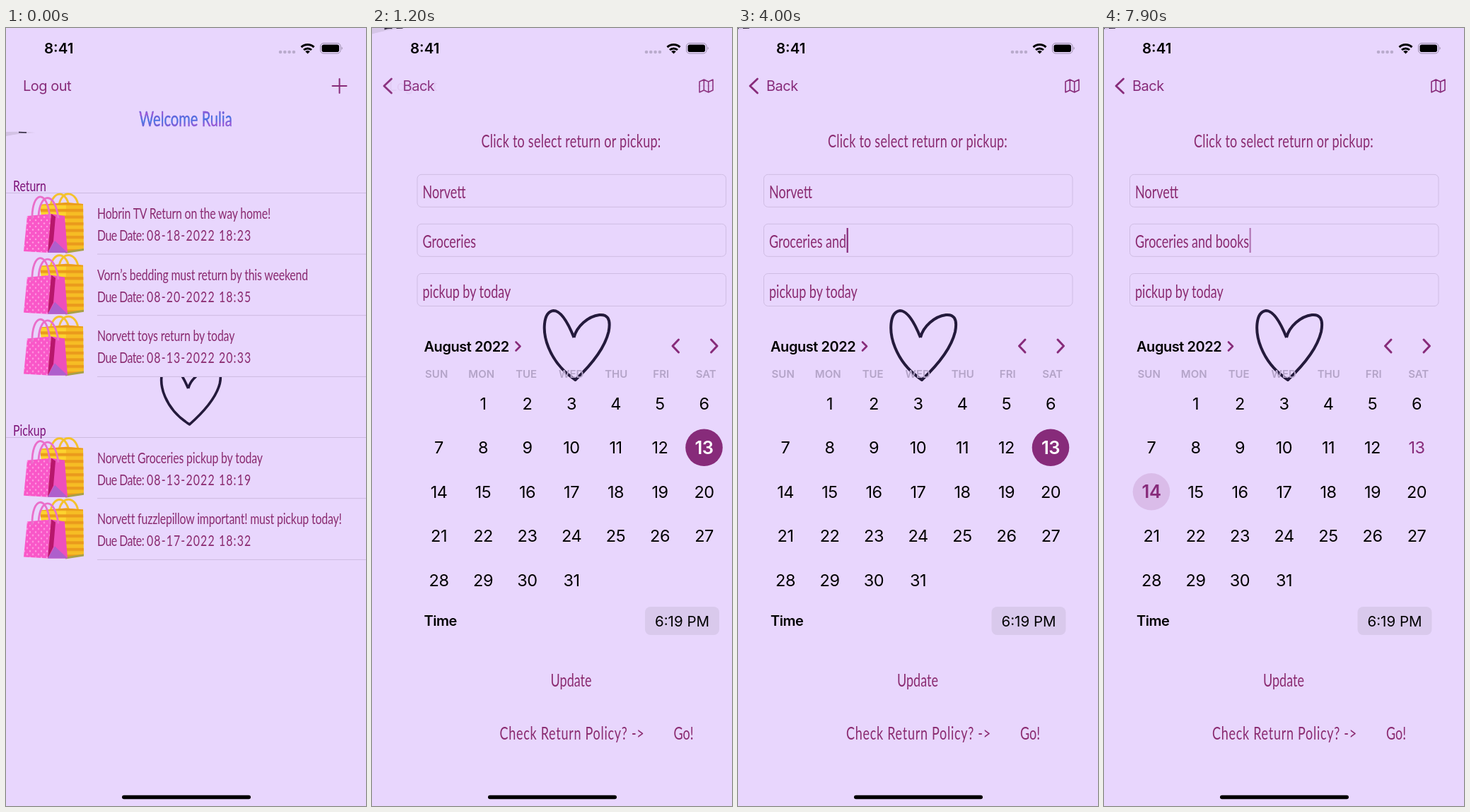
An HTML page that plays this animation: 509 px wide and 1101 px high, repeating every 8000 ms.

```html
<!DOCTYPE html>
<html lang="en">
<head>
<meta charset="utf-8">
<title>Errands</title>
<style>
html, body { margin: 0; width: 100%; height: 100%; overflow: hidden; background: #e8d6fd; }
svg { display: block; width: 100%; height: 100%; }
text { white-space: pre; }
.hand { font-family: Lato, sans-serif; fill: #8a2a70; }
.ui { font-family: Inter, sans-serif; }
.line { fill: none; stroke: #872b7a; stroke-linecap: round; stroke-linejoin: round; }
.rule { stroke: #cdbbe0; stroke-width: 1; }
</style>
</head>
<body>
<svg id="stage" viewBox="0 0 509 1101"></svg>
<script>
const LOOP = 8000, W = 509;
const BG = '#e8d6fd', ACCENT = '#872b7a';
const NARROW = 0.72; // one condensed cut for all handwriting

const hand = (x, y, str, size, opt = '') =>
  `<text class="hand" transform="translate(${x} ${y}) scale(${NARROW} 1)" font-size="${size}" ${opt}>${str}</text>`;
const ui = (x, y, str, size, opt = '') =>
  `<text class="ui" x="${x}" y="${y}" font-size="${size}" ${opt}>${str}</text>`;
const line = (d, width, opt = '') => `<path class="line" d="${d}" stroke-width="${width}" ${opt}/>`;
const rule = (x, y) => `<path class="rule" d="M${x} ${y}H${W}"/>`;
const MID = 'text-anchor="middle"';

const defs = `<defs>
  <linearGradient id="shine" x1="0" y1="0" x2=".06" y2=".3" spreadMethod="reflect">
    <stop offset="0" stop-color="#3f78e4"/><stop offset=".55" stop-color="#6a5fdc"/><stop offset="1" stop-color="#b24fd2"/>
  </linearGradient>
  <pattern id="dots" width="8" height="9" patternUnits="userSpaceOnUse">
    <circle cx="2" cy="2" r="1.2" fill="#ff9ce2"/><circle cx="6" cy="6.5" r="1.2" fill="#ff9ce2"/>
  </pattern>
  <pattern id="bands" width="10" height="9.5" patternUnits="userSpaceOnUse">
    <rect width="10" height="4.2" y="3" fill="#ea9a1c"/>
  </pattern>
  <clipPath id="below"><rect y="494" width="${W}" height="80"/></clipPath>
  <path id="heart" d="M258 438C250 418 240 400 229 400C214 402 213 430 222 452C230 472 245 488 260 498C278 481 301 455 307 430C311 410 304 405 294 406C278 408 262 422 258 438"
    fill="none" stroke="#241a3c" stroke-width="4" stroke-linejoin="round"/>
  <g id="bags">
    <g fill="none" stroke="#f4c22c" stroke-width="3">
      <path d="M39 18C42-4 61-5 65 18"/><path d="M51 17C54-5 75-4 78 17"/>
    </g>
    <path d="M24 16L61 13L62 84L30 70Z" fill="#fcd32e"/>
    <path d="M61 13L85 15L86 80L60 84Z" fill="#f6bd24"/>
    <path d="M24 16L61 13L85 15L86 80L60 84L30 70Z" fill="url(#bands)"/>
    <path d="M61 82L86 78V81L60 85Z" fill="#a9a047"/>
    <path d="M6 32L40 29L35 84L1 82Z" fill="#f957c8"/>
    <path d="M6 32L40 29L35 84L1 82Z" fill="url(#dots)"/>
    <path d="M40 29L59 32L63 84H35Z" fill="#ee4fbc"/>
    <path d="M40 29L46 33L43 68L35 84Z" fill="#b8176c"/>
    <path d="M45 67L63 84H35Z" fill="#ae5fcc"/>
    <g fill="none" stroke="#ea6fca" stroke-width="2.8">
      <path d="M13 37C12-4 35-7 38 35"/><path d="M22 32C24-1 45-4 50 35"/>
    </g>
  </g>
</defs>`;

function row(y, title, date) {
  return `<use href="#bags" x="24" y="${y}"/>`
    + hand(129, y + 36, title, 22, 'letter-spacing="-.2"')
    + hand(129, y + 67, 'Due Date:', 22, 'letter-spacing="-.7"')
    + hand(199, y + 67, date, 22, 'letter-spacing="1.6"')
    + rule(129, y + 86);
}

const list = `<g id="list">
  <rect width="900" height="1101" fill="${BG}"/>
  <path d="M0 147Q20 146 42 148Q18 149 0 153Z" fill="#d3c2e4"/>
  <path d="M18 147.5L29 148" stroke="#2a2238" stroke-width="1.6"/>
  ${hand(254, 139, 'Welcome Rulia', 28, MID + ' style="fill:url(#shine)" stroke="#5b62da" stroke-width=".4"')}
  <g clip-path="url(#below)">
    <use href="#heart" transform="translate(259.5 561) scale(.91 .85) translate(-260 -498)"/>
  </g>
  ${rule(0, 233.5)}${rule(0, 579.5)}
  ${hand(10, 231, 'Return', 22, 'style="fill:#7d1379"')}
  ${hand(10, 577, 'Pickup', 22, 'style="fill:#7d1379"')}
  ${row(234, 'Hobrin TV Return on the way home!', '08-18-2022 18:23')}
  ${row(320.7, 'Vorn’s bedding must return by this weekend', '08-20-2022 18:35')}
  ${row(407.4, 'Norvett toys return by today', '08-13-2022 20:33')}
  ${row(579.7, 'Norvett Groceries pickup by today', '08-13-2022 18:19')}
  ${row(666.4, 'Norvett fuzzlepillow important! must pickup today!', '08-17-2022 18:32')}
</g>`;

const dayX = d => 67 + 62.5 * (d % 7);
const dayY = d => 531.3 + 62.5 * Math.floor(d / 7);
const day = (d, opt = '') => ui(dayX(d), dayY(d) + 8.4, d, 23.5, `${MID} letter-spacing="-.5" ${opt}`);
const picked = (d, fill, opacity, ink) =>
  `<circle cx="${dayX(d)}" cy="${dayY(d)}" r="26.3" fill="${fill}" opacity="${opacity}"/>`
  + ui(dayX(d), dayY(d) + 9, d, 25.5, `${MID} font-weight="600" letter-spacing="-.5" fill="${ink}"`);

let month = '';
for (let d = 1; d <= 31; d++) if (d !== 13 && d !== 14) month += day(d);
const week = ['SUN', 'MON', 'TUE', 'WED', 'THU', 'FRI', 'SAT'].map((s, i) =>
  ui(63.7 + 63.5 * i, 495, s, 15, `${MID} font-weight="600" fill="#b4a4c8"`)).join('');
const field = (y, str, id) =>
  `<rect x="36.5" y="${y}" width="436.5" height="46" rx="6" fill="none" stroke="#cfbde3"/>`
  + hand(44, y + 34, str, 25, id ? `id="${id}"` : '');

const form = `<g id="form">
  <rect x="-29" width="900" height="1101" fill="${BG}"/>
  <path d="M-29 0H18Q-4 2-29 9Z" fill="#d5c5e7"/>
  <path d="M-10 1.5Q-4-.5 1 .3M7 0L16-.2" fill="none" stroke="#2a2238" stroke-width="2"/>
  <use href="#heart"/>
  ${hand(254, 168.5, 'Click to select return or pickup:', 25, MID + ' letter-spacing=".35"')}
  ${field(207.3, 'Norvett')}
  ${field(277.3, 'Groceries', 'typed')}
  ${field(347.5, 'pickup by today')}
  <rect id="caret" y="283" width="2.2" height="35" fill="${ACCENT}"/>
  ${ui(46, 457.5, 'August 2022', 20, 'font-weight="600" letter-spacing="-.45"')}
  ${line('M176 444.5L182 450.5L176 456.5', 2.6)}
  ${line('M406 441L397.5 450L406 459', 3)}
  ${line('M452 441L460.5 450L452 459', 3)}
  ${week}${month}
  <g id="before">${picked(13, ACCENT, 1, '#fff')}${day(14)}</g>
  <g id="after">${day(13, `fill="${ACCENT}"`)}${picked(14, ACCENT, 0.15, ACCENT)}</g>
  ${ui(46, 846, 'Time', 20, 'font-weight="600" letter-spacing="-.5"')}
  <rect x="358.5" y="819" width="105" height="40" rx="8" fill="#d9c9ec"/>
  ${ui(411, 846.5, '6:19 PM', 20.5, MID)}
  ${hand(254, 932, 'Update', 25, MID)}
  ${hand(153, 1007, 'Check Return Policy? -&gt;', 25, 'letter-spacing="1"')}
  ${hand(399, 1007, 'Go!', 25)}
</g>`;

const nav = `
  <g id="home">${ui(24, 89, 'Log out', 20, `fill="${ACCENT}" letter-spacing="-.5"`)}
    ${line('M461.5 82H481.5M471.5 72V92', 2)}</g>
  <g id="sub">
    ${line('M27.5 72L17 82L27.5 92', 2.8)}
    <g id="back">${ui(40, 89, 'Back', 20, `fill="${ACCENT}" letter-spacing="-.5"`)}</g>
    ${line('M463 76L469.3 73L475.7 76L482 73V88L475.7 91L469.3 88L463 91ZM469.3 73V88M475.7 76V91', 1.6)}
  </g>`;

const dots = [388, 394.3, 400.6, 406.9].map(x => `<circle cx="${x}" cy="34" r="2.3" fill="#b9abcc"/>`).join('');
const status = `
  ${ui(54, 36.3, '8:41', 20.5, 'font-weight="600"')}${dots}
  <g fill="none" stroke="#000" stroke-width="3">
    <path d="M417.5 27.2A13 13 0 0 1 435.5 27.2"/><path d="M421 31A8.2 8.2 0 0 1 432 31"/>
  </g>
  <path d="M423.2 33.2Q426.5 30.8 429.8 33.2L426.5 36.6Z"/>
  <rect x="444.5" y="21.5" width="28.5" height="14.5" rx="4.5" fill="none" stroke="#988ba8"/>
  <rect x="446.5" y="23.5" width="24.5" height="10.5" rx="2.8"/>
  <path d="M474.5 26.5Q477 28.7 474.5 31Z" fill="#988ba8"/>
  <rect x="164" y="1085.7" width="182" height="5.6" rx="2.8"/>`;

const $ = id => document.getElementById(id);
$('stage').innerHTML = defs + list + `<rect id="dim" width="${W}" height="1101"/>` + form + nav + status;

const keys = [3600, 3800, 3900, 4000, 4200, 4300, 4500, 4700, 4800, 5000];
const EXTRA = ' and books';

// Share of the push still to go: a critically damped spring.
function remaining(t) {
  if (t < 1000) return 1;
  const a = 0.01845 * (t - 948);
  return t >= 1500 ? 0 : (1 + a) * Math.exp(-a);
}

function caretAlpha(t) {
  if (t < 2700) return 0;
  if (t < 2900) return (t - 2600) / 300;
  if (t >= 3600 && t < 5000) return 1;
  const phase = t < 3600 ? t - 2900 : t % 1000;
  if (phase < 500) return 1;
  return phase < 800 ? Math.max(0, 0.8 - (phase - 500) / 250) : Math.max(0, (phase - 800) / 180);
}

function draw(time) {
  const t = Math.floor(time / 100) * 100;
  const left = remaining(t), done = 1 - left;

  $('list').setAttribute('transform', `translate(${-0.3 * W * done} 0)`);
  $('dim').setAttribute('opacity', 0.13 * done);
  $('form').setAttribute('transform', `translate(${t < 1000 ? W + 40 : W * left} 0)`);
  $('home').setAttribute('opacity', Math.min(1, 1.1 * left));
  $('sub').setAttribute('opacity', done < 0.5 ? done * 0.7 : done);
  $('back').setAttribute('transform', `translate(${0.131 * W * left} 0)`);

  const count = keys.filter(k => k <= t).length;
  const typed = $('typed');
  typed.textContent = 'Groceries' + EXTRA.slice(0, count);
  $('caret').setAttribute('x', 44.5 + typed.getComputedTextLength() * NARROW);
  $('caret').setAttribute('opacity', caretAlpha(t));

  const moved = t >= 7800;
  $('before').setAttribute('display', moved ? 'none' : 'inline');
  $('after').setAttribute('display', moved ? 'inline' : 'none');
}

const start = performance.now();
function tick() {
  draw((performance.now() - start) % LOOP);
  requestAnimationFrame(tick);
}
tick();
</script>
</body>
</html>
```
